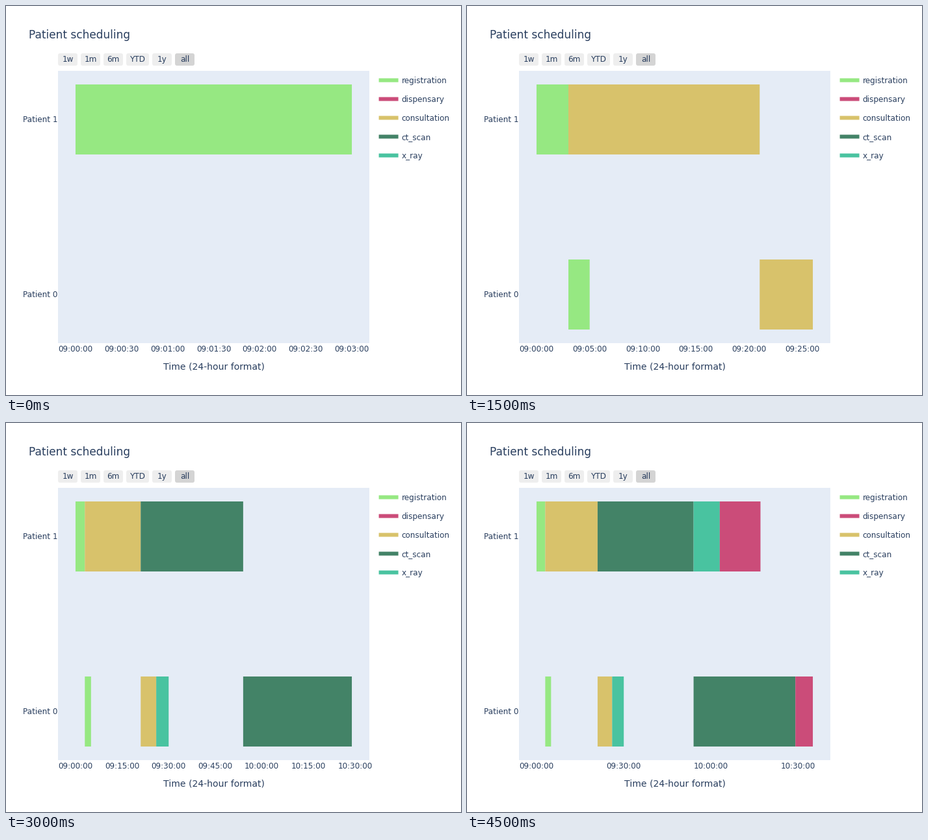
These frames come from a looping animation (700x600 px, 5000 ms). A matplotlib script:

```python
import matplotlib.pyplot as plt
from matplotlib.animation import FuncAnimation
from matplotlib.patches import FancyBboxPatch, Rectangle

W, H, DPI = 700, 600, 100
INK = "#2a3f5f"
COLORS = {
    "registration": "#96e882",
    "dispensary": "#cb4c79",
    "consultation": "#d8c26b",
    "ct_scan": "#438367",
    "x_ray": "#49c3a0",
}
# (patient, task, start minute, end minute), in order of appearance
TASKS = [
    (1, "registration", 0, 3),
    (1, "consultation", 3, 21),
    (0, "registration", 3, 5),
    (0, "consultation", 21, 26),
    (1, "ct_scan", 21, 54),
    (0, "x_ray", 26, 30),
    (0, "ct_scan", 54, 89),
    (1, "x_ray", 54, 63),
    (1, "dispensary", 63, 77),
    (0, "dispensary", 89, 95),
]
STEPS = [0.25, 0.5, 1, 2, 5, 10, 15, 30, 60]   # tick steps in minutes
LEFT, TOP, PLOT_W, PLOT_H = 80, 100, 479, 420
PAD = 26.95                                    # space beside the bars
SPAN = PLOT_W - 2 * PAD
ROW_Y = {1: 175, 0: 445}
BAR_H = 108

plt.rcParams["font.family"] = "DejaVu Sans"
fig = plt.figure(figsize=(W / DPI, H / DPI), dpi=DPI, facecolor="white")
ax = fig.add_axes([0, 0, 1, 1])
ax.set_xlim(0, W)
ax.set_ylim(H, 0)
ax.axis("off")


def label(x, y, text, size=12, ha="left"):
    return ax.text(x, y, text, fontsize=size * 72 / DPI, color=INK,
                   ha=ha, va="baseline", zorder=3)


def rect(x, y, w, h, color, zorder=1):
    return ax.add_patch(Rectangle((x, y), w, h, facecolor=color, linewidth=0,
                                  edgecolor="none", snap=False, zorder=zorder))


def button(x, w, text, color):
    ax.add_patch(FancyBboxPatch((x, 73), w, 19, facecolor=color, linewidth=0,
                                edgecolor="none",
                                boxstyle="round,pad=0,rounding_size=3"))
    label(x + w / 2, 86, text, ha="center")


def clock(minutes):
    s = round(minutes * 60) + 9 * 3600
    return f"{s // 3600:02d}:{s // 60 % 60:02d}:{s % 60:02d}"


def draw_static():
    rect(LEFT, TOP, PLOT_W, PLOT_H, "#e5ecf6", zorder=0)
    label(35, 50, "Patient scheduling", 17)
    label(LEFT + PLOT_W / 2, 561, "Time (24-hour format)", 14, "center")
    for patient, y in ROW_Y.items():
        label(79, y + 4, f"Patient {patient}", ha="right")
    x = LEFT
    for text in ("1w", "1m", "6m", "YTD", "1y", "all"):
        w = 35 if text == "YTD" else 30
        button(x, w, text, "#d4d4d4" if text == "all" else "#eeeeee")
        x += w + 5
    for i, (name, color) in enumerate(COLORS.items()):
        y = 114.5 + 29 * i
        rect(573.58, y - 3, 30, 6, color)
        label(608.58, y + 4.5, name)


draw_static()
moving = []


def update(frame):
    while moving:
        moving.pop().remove()
    shown = TASKS[:frame + 1]
    total = max(end for *_, end in shown)
    scale = SPAN / total
    x0 = LEFT + PAD

    for patient, name, start, end in shown:
        moving.append(rect(x0 + start * scale, ROW_Y[patient] - BAR_H / 2,
                           (end - start) * scale, BAR_H, COLORS[name]))

    visible = PLOT_W / scale
    step = next(s for s in STEPS if visible / s <= 7)
    t = 0
    while x0 + t * scale <= LEFT + PLOT_W:
        moving.append(label(x0 + t * scale, 533, clock(t), ha="center"))
        t += step
    return moving


anim = FuncAnimation(fig, update, frames=len(TASKS), interval=500,
                     repeat=True, repeat_delay=0, blit=False)
plt.show()
```
